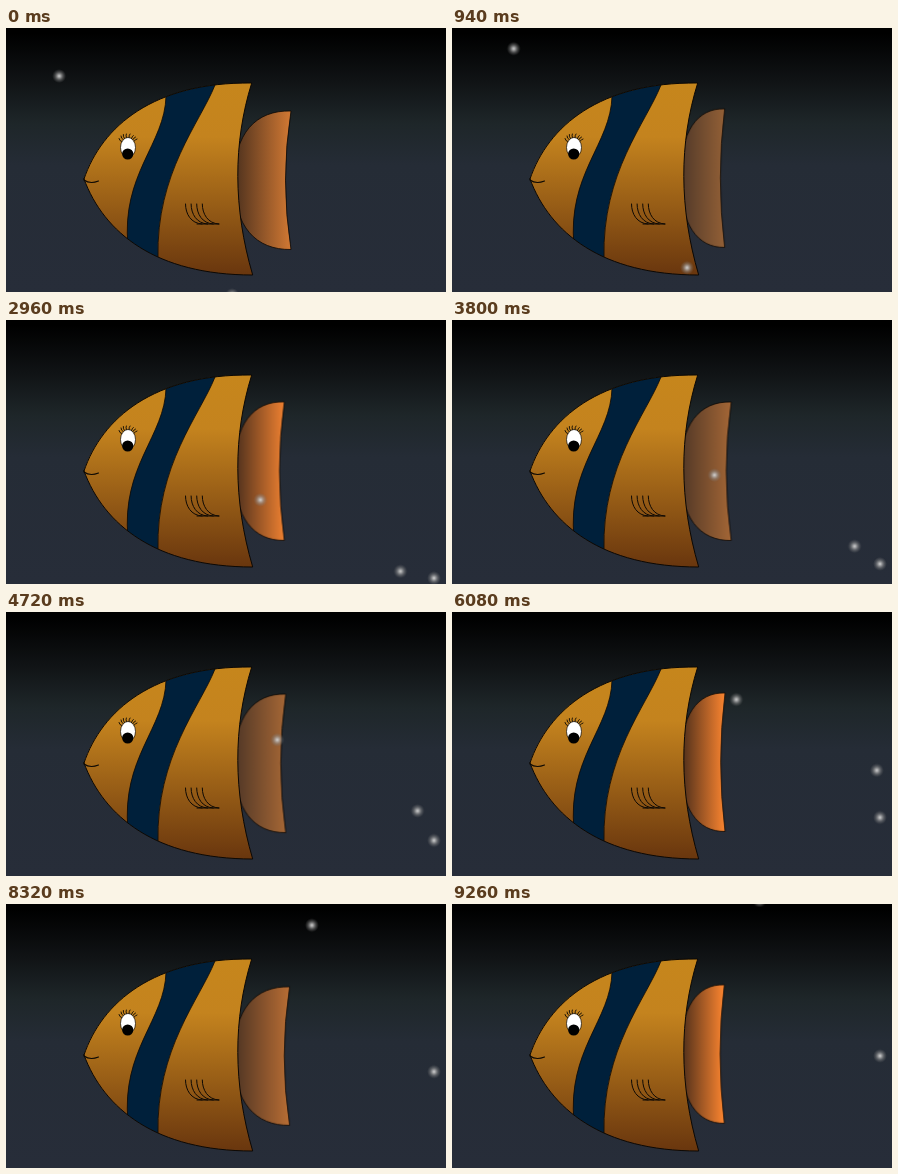
An HTML page for the animation above (9280 ms loop, 440 by 264 pixels).

```html
<!DOCTYPE html>
<html lang="en">
<head>
<meta charset="utf-8">
<title>Fish and bubbles</title>
<style>
  html, body { margin: 0; width: 100%; height: 100%; overflow: hidden; background: #000; }
  svg { display: block; width: 440px; height: 264px; }

  .line { fill: none; stroke: #0c0804; stroke-linecap: round; }

  /* The tail swings both ways: narrow at each end, bright on one side and dull on the other. */
  .tail, .root, .edge {
    animation: 9280ms cubic-bezier(.364, 0, .636, 1) infinite;
  }
  .tail { animation-name: swing; transform-origin: 230px 0; }
  .root { animation-name: root; }
  .edge { animation-name: edge; }

  @keyframes swing {
    0%, 18.32%, 36.64%, 54.96%, 73.28%, 91.6% { transform: none; }
    9.16%, 27.48%, 45.8%, 64.12%, 82.44%, 100% {
      transform: translateY(-2.2px) scaleX(.77);
    }
  }
  @keyframes root {
    0% { stop-color: #56361f; animation-timing-function: cubic-bezier(.36, .57, .64, 1); }
    9.16%, 45.8%, 82.44% { stop-color: #563c2a; }
    27.48%, 64.12%, 100% { stop-color: #56331c; }
  }
  @keyframes edge {
    0% { stop-color: #cb7532; animation-timing-function: cubic-bezier(.36, .57, .64, 1); }
    9.16%, 45.8%, 82.44% { stop-color: #8f5e36; }
    27.48%, 64.12%, 100% { stop-color: #f3812f; }
  }

  .bubble { fill: url(#glow); animation: rise 9280ms linear infinite; }
  .first { animation-name: leave; }
  .second { animation-name: cross; }

  @keyframes rise {
    from { transform: translate(var(--from)); }
    to { transform: translate(var(--to)); }
  }
  @keyframes leave {
    0% { transform: translate(53px, 48.5px); }
    10.56% { transform: translate(62px, 19.5px); }
    20.2% { transform: translate(63.5px, -5px); }
    20.3%, 100% { transform: translate(64px, -20px); }
  }
  @keyframes cross {
    0% { transform: translate(226px, 267.5px); }
    90.3% { transform: translate(306.4px, 19.5px); }
    100% { transform: translate(307.5px, -4px); }
  }
</style>
</head>
<body>
<svg viewBox="0 0 440 264">
  <defs>
    <linearGradient id="water" x2="0" y2="1">
      <stop offset=".02" stop-color="#000"/>
      <stop offset=".2" stop-color="#101315"/>
      <stop offset=".36" stop-color="#1e2629"/>
      <stop offset=".52" stop-color="#252c36"/>
      <stop offset="1" stop-color="#272d39"/>
    </linearGradient>
    <linearGradient id="skin" x2="0" y2="1">
      <stop offset="0" stop-color="#c6861c"/>
      <stop offset=".28" stop-color="#c4831e"/>
      <stop offset="1" stop-color="#69360e"/>
    </linearGradient>
    <linearGradient id="fan" gradientUnits="userSpaceOnUse" x1="232" x2="282" y1="0" y2="0">
      <stop class="root" offset="0"/>
      <stop class="edge" offset="1"/>
    </linearGradient>
    <radialGradient id="glow">
      <stop offset="0" stop-color="#ddd" stop-opacity=".95"/>
      <stop offset=".25" stop-color="#b8b8b8" stop-opacity=".8"/>
      <stop offset=".6" stop-color="#909090" stop-opacity=".42"/>
      <stop offset="1" stop-color="#777" stop-opacity="0"/>
    </radialGradient>
    <path id="body" d="M78 151C96 98 148 54 245.700 55C227 115 227 180 246.700 247C150 247 98 205 78 151Z"/>
    <clipPath id="inside"><use href="#body"/></clipPath>
    <path id="ray" d="M179.500 176C179.500 186 185 195.500 196 196"/>
  </defs>

  <rect width="440" height="264" fill="url(#water)"/>

  <path class="tail" fill="url(#fan)" stroke="#0c0804" stroke-width=".8" vector-effect="non-scaling-stroke"
    d="M285 83C250 82 228 105 228 152S250 222 285 221.500Q274 152 285 83Z"/>

  <use href="#body" fill="url(#skin)"/>
  <path clip-path="url(#inside)" fill="#00203b" stroke="#0c0804" stroke-width=".8"
    d="M160 60V68C159 116 115 146 122 218L152 238V230C150 145 194 95 209 57V48Z"/>
  <use href="#body" class="line"/>

  <path class="line" stroke-width="1.100" d="M78 152Q84 156.500 92.500 153"/>
  <ellipse cx="122" cy="119.500" rx="7.500" ry="10" fill="#fff" stroke="#0c0804" stroke-width=".7"/>
  <circle cx="121.700" cy="126" r="5.600" fill="#000"/>
  <path class="line" stroke-width=".9"
    d="M115.500 113.500Q113.500 113 113 110.500M117 111.500Q115 110.500 115 108M118.500 110.500Q117 109 117.300 106.500M120.500 109.500Q119.500 108 120.300 106M123 109.500Q122.800 107.500 124 106M125.500 110.500Q126 108.500 127.300 107.500M127 111.500Q128 109.500 129.500 109M128.200 113Q129.500 111.500 131 111"/>
  <g class="line">
    <use href="#ray"/>
    <use href="#ray" x="5.600"/>
    <use href="#ray" x="11.200"/>
    <use href="#ray" x="16.800"/>
    <path d="M191 196H213"/>
  </g>

  <circle class="bubble first" r="7"/>
  <circle class="bubble second" r="7"/>
  <circle class="bubble" r="7" style="--from: 365.5px, 339.5px; --to: 456px, 63px"/>
  <circle class="bubble" r="7" style="--from: 428px, 308px; --to: 428px, 151.500px"/>
</svg>
</body>
</html>
```
